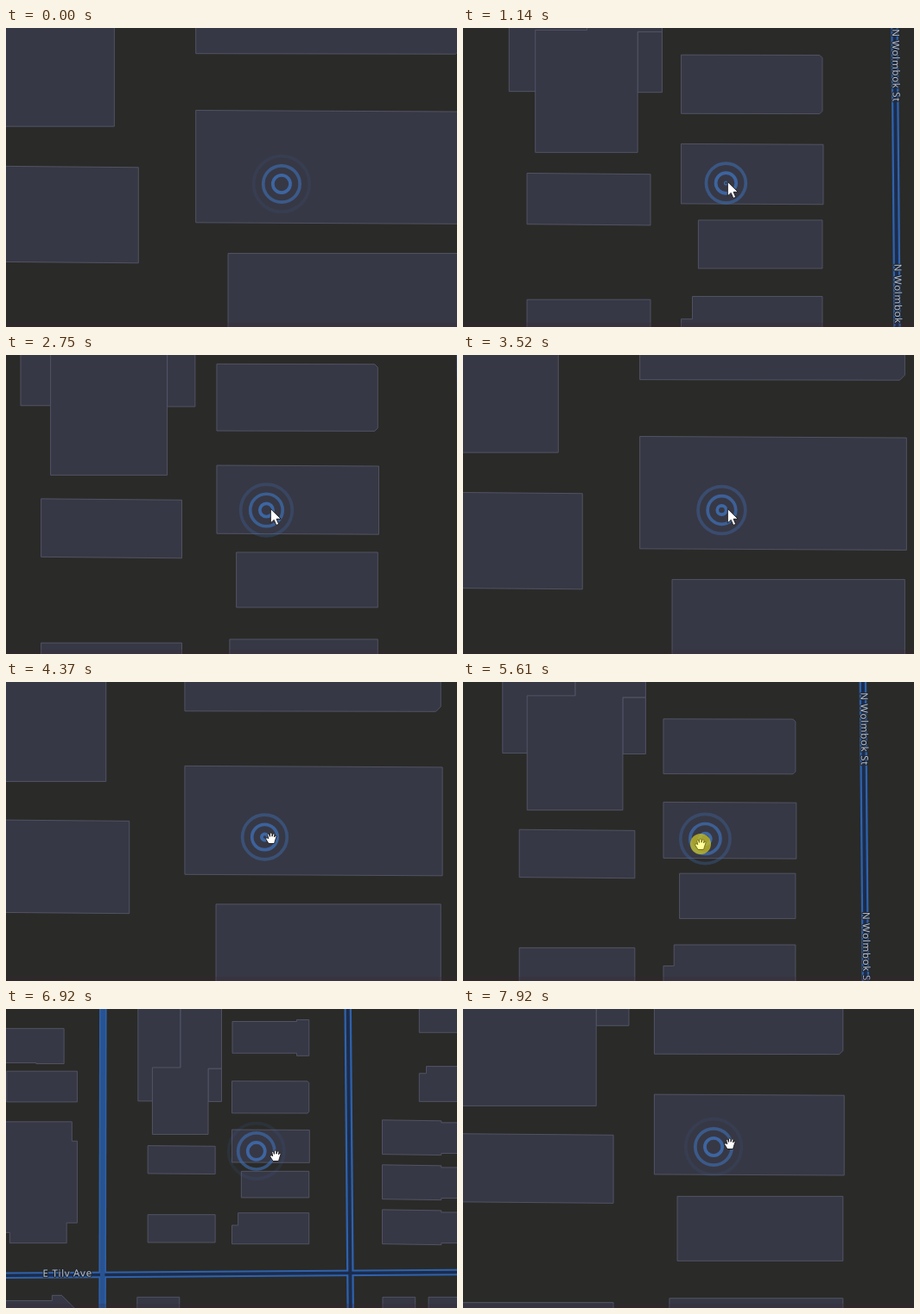
An HTML page with a canvas for the animation above (8 s loop, 522 by 347 pixels).

```html
<!DOCTYPE html>
<html lang="en">
<head>
<meta charset="utf-8">
<title>Map zoom</title>
<style>
html, body { margin: 0; width: 100%; height: 100%; overflow: hidden; background: #2a2a28; }
canvas { display: block; width: 522px; height: 347px; }
</style>
</head>
<body>
<canvas id="map" width="522" height="347"></canvas>
<script>
const ctx = document.getElementById('map').getContext('2d');
const W = 522, H = 347, LOOP = 8000;
const BLUE = '#2f62ab', NAVY = '#1c2c4b';
const FOCUS = { x: 303.5, y: 180 };
const WIDE = 0.5605;

// The surroundings are laid out at the widest zoom and scaled to the block around the marker.
const fromWide = ([x, y]) => [254.5 + (x - 262) / WIDE, 136.5 + (y - 140.5) / WIDE];

// A rectangle whose corners can be stepped in ([dx, dy]) or bevelled (a number).
function block(x, y, w, h, { tl, tr, br, bl, slant = 0 } = {}) {
  const corner = (cx, cy, sx, sy, cut, flip) => {
    if (!cut) return [[cx, cy]];
    const [dx, dy] = cut.length ? cut : [cut, cut];
    const steps = [[cx, cy + sy * dy], [cx + sx * dx, cy + sy * dy], [cx + sx * dx, cy]];
    if (!cut.length) steps.splice(1, 1);
    return flip ? steps.reverse() : steps;
  };
  return [
    ...corner(x, y, 1, 1, tl, false),
    ...corner(x + w, y + slant, -1, 1, tr, true),
    ...corner(x + w, y + h + slant, -1, -1, br, false),
    ...corner(x, y + h, 1, -1, bl, true)
  ];
}

const porch = [20, 2];
const repeat = (n, make) => Array.from({ length: n }, (_, i) => make(i));

const buildings = [
  block(64.5, -200, 86, 278.5),
  block(206.5, 12.5, 27, 67),
  block(93.5, -200, 140, 346, { tl: [57, 210.5], br: [27, 133.5] }),
  block(254.5, 38, 156, 65, { tr: 3, br: 3, slant: 0.3 }),
  block(254.5, 136.5, 157, 66.3, { slant: 0.8 }),
  block(273.5, 221, 137, 53.5),
  block(254.5, 305.5, 156, 63, { tl: [12.5, 25] }),
  block(84.3, 169, 136.4, 56.5, { slant: 1.2 }),
  block(84.3, 309, 136.4, 56.5)
].concat([
  block(262.5, 15.5, 87, 41, { tl: [73, 2], bl: [73, 3] }),
  block(-30, 25.5, 101.5, 40, { bl: [70, 1] }),
  block(6.5, 74, 80, 35),
  block(-30, 131.5, 116.5, 138, { tr: [6, 22], br: [12, 23], bl: [40, 12] }),
  block(-30, 329, 118, 70, { tl: [88, 6], tr: 19 }),
  block(154.5, 331, 48, 60),
  ...repeat(2, i => block(433 + 52 * i, 331, 37 + 20 * i, 60)),
  ...repeat(2, i => block(474.5, -10 + 78.5 * i, 80, 40, { tl: [8, 8] })),
  ...repeat(3, i => block(432.5, 129.5 + 51 * i, 87, 39, { slant: 1, tr: porch, br: porch }))
].map(shape => shape.map(fromWide)));

const roads = [
  { ends: [[-60, 306.8], [600, 302]], width: 7.5, inner: 3.5, core: NAVY },
  { ends: [[391.8, -200], [399.3, 668]], width: 8.5, inner: 4, core: NAVY },
  { ends: [[116.2, -200], [114.6, 600]], width: 8.5, inner: 5.5, core: '#285391' }
].map(road => ({ ...road, ends: road.ends.map(fromWide) }));

// Key points: time, zoom, and the screen position of the focus
const camera = [
  [0, 1.966, 316, 181], [850, 1.06, 304, 180], [2060, 1, 303, 180], [2480, 1, 303, 180],
  [3370, 1.966, 301, 180], [3900, 1.966, 301, 180], [4370, 1.9, 300, 180],
  [5140, 1.12, 298, 180], [5610, 0.98, 280, 182], [5950, 0.97, 280, 182],
  [6880, WIDE, 289.5, 165], [7920, 1.4, 290, 160], [LOOP, 1.42, 290, 160]
];
const handPath = [
  [4370, 307, 181], [5140, 293, 186], [5610, 275, 188], [6920, 312, 170], [7920, 309, 156]
];

function sample(keys, t) {
  const next = keys.findIndex(key => key[0] >= t);
  const i = next < 0 ? keys.length - 1 : Math.max(1, next);
  const a = keys[i - 1], b = keys[i];
  const u = Math.min(1, Math.max(0, (t - a[0]) / (b[0] - a[0])));
  const eased = (u + u * u * (3 - 2 * u)) / 2;
  return a.slice(1).map((v, j) => v + (b[j + 1] - v) * eased);
}

const zoomKeys = camera.map(([t, zoom, x, y]) => [t, Math.log(zoom), x, y]);

function trace(shape, view) {
  ctx.beginPath();
  for (const p of shape) ctx.lineTo(...view(p));
}

function drawLabel(text, [x, y], angle) {
  ctx.save();
  ctx.translate(x, y);
  ctx.rotate(angle);
  ctx.font = '11.5px "Noto Sans", "Open Sans", sans-serif';
  ctx.letterSpacing = '0.7px';
  ctx.textAlign = 'center';
  ctx.textBaseline = 'middle';
  ctx.lineJoin = 'round';
  ctx.lineWidth = 2;
  ctx.strokeStyle = '#20262f';
  ctx.strokeText(text, 0, 0);
  ctx.fillStyle = '#b8c2d0';
  ctx.fillText(text, 0, 0);
  ctx.restore();
}

function drawMap(view, zoom) {
  ctx.fillStyle = '#373845';
  ctx.strokeStyle = '#55576a';
  ctx.lineWidth = 0.9;
  for (const shape of buildings) {
    trace(shape, view);
    ctx.closePath();
    ctx.fill();
    ctx.stroke();
  }
  for (const part of ['width', 'inner']) {
    for (const road of roads) {
      trace(road.ends, view);
      ctx.lineWidth = road[part];
      ctx.strokeStyle = part === 'width' ? BLUE : road.core;
      ctx.stroke();
    }
  }
  if (zoom > 0.8 && zoom < 1.6) {
    for (const y of [50, 310]) {
      drawLabel('N Wolmbok St', view([490.6 + y * 0.009, y]), Math.PI / 2 - 0.009);
    }
  }
  if (zoom < 0.75) drawLabel('E Tilv Ave', view(fromWide([75.5, 304.5])), -0.008);
}

function drawRings(t, [x, y]) {
  const phase = (t / 990 + 0.91) % 1;
  ctx.lineWidth = 3.7;
  for (let i = 0; i < 3; i++) {
    const r = (phase + i) * 11.1;
    const alpha = 0.88 * Math.max(0, 1 - (r / 34) ** 2.7);
    ctx.strokeStyle = `rgba(62,110,178,${alpha})`;
    ctx.beginPath();
    ctx.arc(x, y, r, 0, 7);
    ctx.stroke();
  }
}

const arrow = new Path2D('M0 0V16.5L3.9 12.9L6.5 19L9.4 17.8L6.8 11.8H12Z');
const hand = new Path2D('M-3 6.5L-6.3 1.2Q-6.6-.8-4.4-.2L-3.3 1L-4.2-3.6Q-3.6-5.4-2.2-4.2L-1.6-1.6L-1.4-5.4Q0-6.8.9-5.4L1-1.8L2-4.9Q3.4-5.8 4-4.2L3.5-1L4.7-2.8Q6.2-3 6-1.4L4.3 3.8L3.6 6.5Z');

function drawPointer(t) {
  if (t < 900) return;
  const grabbing = t > 4250;
  const pressed = t > 5250 && t < 5900;
  const [x, y] = grabbing ? sample(handPath, t) : [306.3, 178.5];
  ctx.save();
  ctx.translate(x, y);
  if (pressed) {
    ctx.fillStyle = 'rgba(196,190,40,.78)';
    ctx.beginPath();
    ctx.arc(0, 0, 12, 0, 7);
    ctx.fill();
  }
  const shape = grabbing ? hand : arrow;
  ctx.lineWidth = 1;
  ctx.strokeStyle = pressed ? '#77731c' : '#202024';
  ctx.fillStyle = pressed ? '#ffff9c' : '#fff';
  ctx.fill(shape);
  ctx.stroke(shape);
  ctx.restore();
}

function draw() {
  const t = performance.now() % LOOP;
  const [logZoom, x, y] = sample(zoomKeys, t);
  const zoom = Math.exp(logZoom);
  const view = p => [x + (p[0] - FOCUS.x) * zoom, y + (p[1] - FOCUS.y) * zoom];
  // The located position wavers a little and settles.
  const drift = 1.5 * Math.exp(-t / 6000) * Math.cos(2 * Math.PI * t / 6400);
  ctx.fillStyle = '#2a2a28';
  ctx.fillRect(0, 0, W, H);
  drawMap(view, zoom);
  drawRings(t, view([FOCUS.x + drift, FOCUS.y]));
  ctx.fillStyle = 'rgba(60,30,50,.2)';
  ctx.fillRect(0, 342, W, 5);
  drawPointer(t);
  requestAnimationFrame(draw);
}
draw();
</script>
</body>
</html>
```
